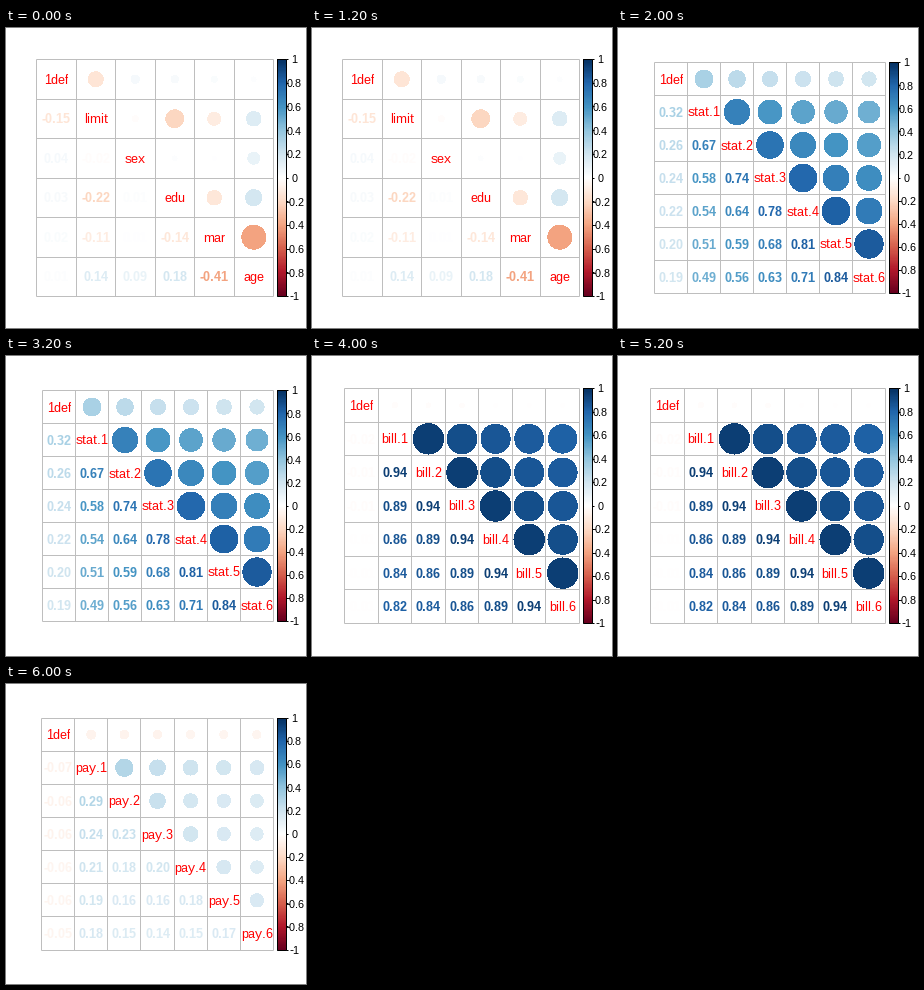
Recreate the animation shown at these times as a matplotlib script. Size 300 by 300 pixels, loop 8000 ms.

```python
import numpy as np
import matplotlib.pyplot as plt
from itertools import combinations
from matplotlib.animation import FuncAnimation
from matplotlib.colors import LinearSegmentedColormap
from matplotlib.patches import Circle, Rectangle

plt.rcParams.update({
    "font.family": "Liberation Sans",
    "text.hinting": "native",
    "text.hinting_factor": 1,
    "toolbar": "None",
})

SIZE, DPI = 300, 100
PX = 72 / DPI
GRID_RIGHT = 267.5
GRID_GREY = "#bebebe"
CMAP = LinearSegmentedColormap.from_list("corr", [
    "#67001f", "#b2182b", "#d6604d", "#f4a582", "#fddbc7", "#ffffff",
    "#d1e5f0", "#92c5de", "#4393c3", "#2166ac", "#053061"], N=200)

PEOPLE = ["1def", "limit", "sex", "edu", "mar", "age"]
STRONG_LINKS = {
    "1def limit": -0.15, "limit edu": -0.22, "limit mar": -0.11,
    "limit age": 0.14, "sex age": 0.09, "edu mar": -0.14,
    "edu age": 0.18, "mar age": -0.41,
}


def people_corr(i, j):
    """Strong links are given; the rest fade out along the list."""
    weak = (-1) ** i * 0.01 * (6 - j) / (i + 1)
    return STRONG_LINKS.get(f"{PEOPLE[i]} {PEOPLE[j]}", weak)


def monthly_corr(first, trend, decay, default, default_decay):
    """Correlation of months falls as a power of the gap between them."""
    def corr(i, j):
        if i == 0:
            return default * j ** -default_decay
        return first * i ** trend * (j - i) ** -decay
    return corr


def months(prefix):
    return ["1def"] + [f"{prefix}.{i}" for i in range(1, 7)]


# Labels, side of the grid, correlation of variables i < j
PLOTS = [
    (PEOPLE, 237, people_corr),
    (months("stat"), 231, monthly_corr(0.67, 0.14, 0.2, 0.32, 0.28)),
    (months("bill"), 235, monthly_corr(0.94, 0, 0.085, -0.02, 0.5)),
    (months("pay"), 232, monthly_corr(0.29, -0.35, 0.3, -0.07, 0.14)),
]

fig = plt.figure(figsize=(SIZE / DPI, SIZE / DPI), dpi=DPI, facecolor="white")
ax = fig.add_axes([0, 0, 1, 1])


def label(x, y, text, size, color, weight="normal"):
    ax.text(x, y + 0.36 * size, text, fontsize=size * PX, color=color,
            weight=weight, ha="center", va="baseline")


def line(xs, ys, color):
    # Snapping moves each line on to the centre of its pixel
    ax.plot(np.array(xs) - 0.5, np.array(ys) - 0.5, color=color, lw=PX,
            solid_capstyle="butt", snap=True)


def draw_grid(left, top, side, n):
    for step in np.linspace(0, side, n + 1):
        line([left + step] * 2, [top, top + side], GRID_GREY)
        line([left, left + side], [top + step] * 2, GRID_GREY)


def draw_legend(top, side):
    left, right = 271, 280
    ax.imshow(np.linspace(1, -1, 200)[:, None], cmap=CMAP, vmin=-1, vmax=1,
              extent=(left, right, top + side, top), aspect="auto",
              interpolation="nearest")
    ax.add_patch(Rectangle((left, top - 0.5), right - left, side,
                           fill=False, ec="black", lw=PX, snap=True))
    for i in range(11):
        y = top + side * i / 10
        line([right, right + 2], [y, y], "black")
        label(288.5, y, f"{(5 - i) / 5:g}", 11, "black")


def draw(frame):
    ax.clear()
    ax.axis("off")
    names, side, corr_of = PLOTS[frame]
    n = len(names)
    left, top = GRID_RIGHT - side, (SIZE - side) / 2
    offsets = (np.arange(n) + 0.5) * side / n
    xs, ys = left + offsets, top + offsets

    draw_legend(top, side)
    draw_grid(left, top, side, n)
    for x, y, name in zip(xs, ys, names):
        label(x, y, name, 12.5, "red")
    for i, j in combinations(range(n), 2):
        corr = corr_of(i, j)
        color = CMAP((corr + 1) / 2)
        label(xs[i], ys[j], f"{corr:.2f}", 13, color, "bold")
        ax.add_patch(Circle((xs[j], ys[i]),
                            0.45 * side / n * abs(corr) ** 0.5,
                            fc=color, ec=color, lw=PX, antialiased=False))
    ax.set(xlim=(0, SIZE), ylim=(SIZE, 0))
    return []


anim = FuncAnimation(fig, draw, frames=len(PLOTS), init_func=lambda: [],
                     interval=2000, repeat=True, repeat_delay=0)
plt.show()
```
